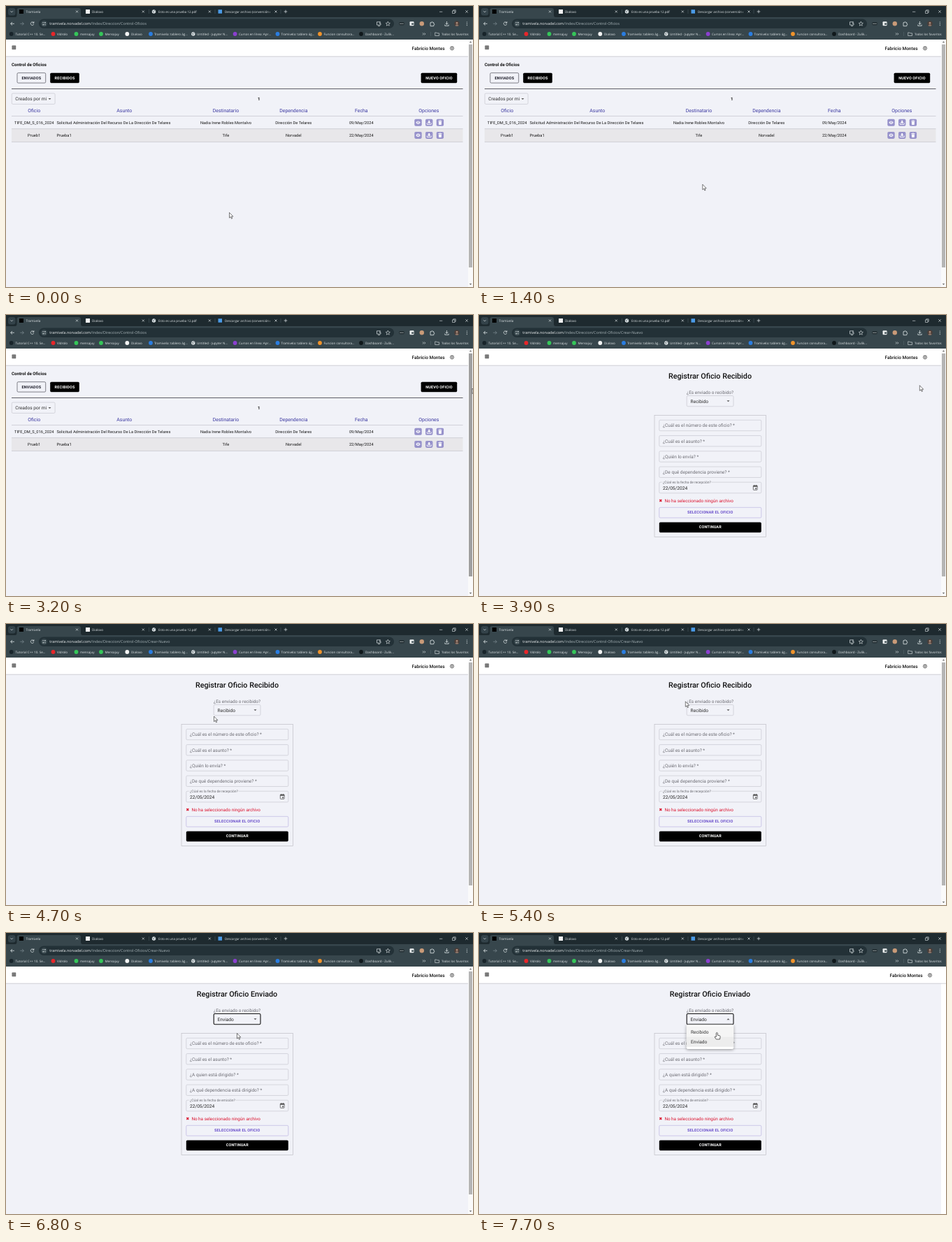
An HTML page that plays this animation: 668x402 px, repeating every 8 s.

```html
<!DOCTYPE html>
<html lang="es">
<head>
<meta charset="utf-8">
<title>Control de Oficios</title>
<style>
  html, body { margin: 0; width: 100%; height: 100%; overflow: hidden; background: #f1f2f8; }
  svg { display: block; width: 668px; height: 402px; text-rendering: geometricPrecision; }
  text { font-family: Roboto, sans-serif; white-space: pre; }
  .ui { font-family: "Open Sans", "Noto Sans", sans-serif; }
  .paper { filter: drop-shadow(0 1.5px 2px rgba(0, 0, 0, .4)); }
</style>
</head>
<body>
<svg id="stage" viewBox="0 0 668 402" xmlns="http://www.w3.org/2000/svg"></svg>
<script>
const LOOP = 8000, STEP = 100;

// --- drawing helpers; y of a text is the middle of its capitals ---
const rect = (x, y, w, h, fill, more = '') =>
  `<rect x="${x}" y="${y}" width="${w}" height="${h}" fill="${fill}" ${more}/>`;
const dot = (x, y, r, fill, more = '') => `<circle cx="${x}" cy="${y}" r="${r}" fill="${fill}" ${more}/>`;
const line = (d, color, w = .7, more = '') => `<path d="${d}" fill="none" stroke="${color}" stroke-width="${w}" ${more}/>`;
const shape = (d, fill, more = '') => `<path d="${d}" fill="${fill}" ${more}/>`;
const text = (s, x, y, size, fill, more = '') =>
  `<text x="${x}" y="${(y + size * .355).toFixed(2)}" font-size="${size}" fill="${fill}" ${more}>${s}</text>`;
const mid = (s, x, y, size, fill, more = '') => text(s, x, y, size, fill, 'text-anchor="middle" ' + more);
const ui = (s, x, y, size = 4.6, fill = '#e3e8ea', more = '') => text(s, x, y, size, fill, 'class="ui" ' + more);
const frame = (x, y, w, h, color = '#c2c2c9', more = '') =>
  rect(x, y, w, h, 'none', `rx="1.6" stroke="${color}" stroke-width=".6" ${more}`);
const group = (id, body, more = '') => `<g id="${id}" ${more}>${body}</g>`;
const caret = (x, y) => shape(`M${x - 2} ${y - 1}h4l-2 2z`, '#555');
const cross = (x, y, r, color, w) =>
  line(`M${x - r} ${y - r}l${2 * r} ${2 * r}m0 ${-2 * r}l${-2 * r} ${2 * r}`, color, w);
const globe = (x, y) => dot(x, y, 2.7, '#dfe5e7') + line(`M${x - 2} ${y - 1}l2 1l-.5 1.6M${x + .5} ${y - 2}l1.2 1.4`, '#4a595f', .8);
const caps = 'font-weight="600" letter-spacing=".14"';

function button(label, x, y, w, h, dark, color = dark ? '#fff' : '#1c1c28', border = '#33333d') {
  const box = dark
    ? rect(x, y, w, h, '#000', 'rx="1.6"') + line(`M${x + 1} ${y + h + .5}h${w - 2}`, '#000', .8, 'opacity=".25"')
    : frame(x, y, w, h, border);
  return box + mid(label, x + w / 2, y + h / 2 - .2, 5.5, color, caps);
}

// --- browser window ---
function browser() {
  const ink = '#dfe6e8';
  let s = rect(0, 0, 668, 48, '#37464c') + rect(0, 0, 668, 16, '#1e2a2f');
  s += rect(3, 3, 10.5, 10.5, '#34434a', 'rx="3"') + line('M6.5 7.3l1.7 1.7l1.7-1.7', ink);
  s += shape('M13 16q2.500 0 2.500-3V6q0-3 3-3H104q3 0 3 3v7q0 3 2.500 3z', '#37464c');
  s += rect(19, 5, 6, 6, '#000') + rect(114, 5, 6, 6, '#f4f4f4') + globe(211.500, 8) + rect(303.500, 5.200, 5.500, 5.500, '#4b9be8');
  s += ui('Tramivela', 28.500, 8) + ui('Dialoxo', 123, 8) + ui('Esto es una prueba 12.pdf', 218, 8, 4.5);
  s += '<clipPath id="tab"><path d="M312 2h66v12h-66z"/></clipPath>' +
    ui('Descargar archivo (conversión de', 313, 8, 4.5, '#e3e8ea', 'clip-path="url(#tab)"');
  for (const x of [101.5, 196.3, 291.3, 386]) s += cross(x, 8, 1.5, ink, .7);
  for (const x of [204.5, 299, 393]) s += line(`M${x} 5v6`, '#52636a', .5);
  s += line('M397.700 8h4.600M400 5.700v4.600', ink);
  s += line('M620 8.300h4.300', ink, .6) + line('M638.500 7h3.500v3.500h-3.500zM639.700 7v-1.200h3.500v3.500h-1.200', ink, .6) + cross(659, 8, 1.8, ink, .6);

  // toolbar
  s += rect(47, 18.5, 508, 13.6, '#233137', 'rx="6.8"');
  s += line('M11.800 25.300H6.700m2.300-2.300l-2.300 2.300l2.300 2.300', ink, .8);
  s += line('M20.300 25.300h5.100m-2.300-2.300l2.300 2.300l-2.300 2.300', '#76868c', .8);
  s += line('M39.600 24a2.300 2.300 0 1 0 .2 1.900M39.900 22.300v2h-2', ink, .8);
  s += dot(54.5, 25.3, 4.6, '#37464c') + line('M52 23.900h2.500M52 26.800h1M55 26.800h2', ink, .7) + dot(56, 23.9, .8, ink) + dot(53.700, 26.8, .8, ink);
  s += ui('tramivela.norvadel.com', 62.3, 25.2, 5.33, '#f1f4f5');
  s += ui('', 121.3, 25.2, 5.33, '#aab6ba', 'id="path"');
  s += line('M535.500 22.800h-5v4.300h5.500v-2M532 28.600h3M535 22.500v2.800m-1.200-1l1.200 1l1.200-1', ink, .7);
  s += line('M546.300 22.200l.9 2.100l2.200.2l-1.700 1.500l.5 2.200l-1.900-1.200l-1.900 1.200l.5-2.200l-1.700-1.500l2.200-.2z', ink, .6);
  s += rect(562.5, 23.3, 7, 4, '#1c272b', 'rx="1"') + line('M563.500 25.300h5', ink, 1, 'stroke-dasharray="1.200 .8"');
  s += rect(577.5, 22.3, 6, 6, '#eef1f1', 'rx="1"') + rect(580, 24.5, 3, 2.4, '#4c5a60');
  s += dot(594.8, 25.3, 3.2, '#c99a78');
  s += line('M607 23.700h1.500a1 1 0 0 1 2 0h1.300v1.600a1 1 0 0 1 0 2v1.400h-4.800z', ink, .8);
  s += line('M630.500 22v4.200m-1.900-1.700l1.900 1.900l1.900-1.900M627.800 26.600v1.700h5.400v-1.700', ink, .8);
  s += dot(645, 25.3, 3.7, '#4a3d38') + dot(645, 24.3, 1.4, '#b08f7e') + shape('M642.400 28q2.600-4 5.200 0q-2.600 2-5.200 0z', '#8c7468');
  for (const y of [23, 25.3, 27.6]) s += dot(659.3, y, .6, ink);

  // bookmarks
  const marks = [
    [7.7, 13.5, '#18242a', 'Tutorial C++ 10. Se...'], [67.5, 73, '#e8262a', 'Vidrolo'],
    [100.5, 106, '#35c659', 'mensajuy'], [136, 141.5, '#35c659', 'Mensajuy'],
    [173.3, 179, '#f2f3f3', 'Dialoxo'], [207, 212, '#2a7de1', 'Tramivela: tablero ág...'],
    [267.8, 273, '', 'Untitled - Jupyter N...'], [327.6, 333, '#8b3fd0', 'Cursos en línea: Apr...'],
    [388.5, 393.5, '#2a7de1', 'Tramivela: tablero ág...'], [449, 454.5, '#f0932b', 'Funcion consultora...'],
    [508, 514, '#10181b', 'Dashboard - Zulik...']
  ];
  for (const [x, tx, color, label] of marks)
    s += (color ? dot(x, 40, 2.9, color) : globe(x, 40)) + ui(label, tx, 40, 4.55);
  s += line('M596 38.500l1.500 1.500l-1.500 1.500M598.300 38.500l1.500 1.500l-1.500 1.500', ink) + line('M607.500 37v6', '#5b6b72', .5);
  s += line('M613.700 38h2l.8.9h3v3.600h-5.800z', ink, .6) + ui('Todos los favoritos', 623, 40, 4.45);
  return s;
}

// --- page parts ---
function header() {
  let gear = dot(0, 0, 2.1, 'none', 'stroke="#555" stroke-width=".8"') + dot(0, 0, .8, '#555');
  for (let i = 0; i < 8; i++) gear += line('M0-2.300v-.9', '#555', 1, `transform="rotate(${i * 45})"`);
  return rect(0, 48, 668, 24, '#fff') + rect(0, 71.8, 668, .7, '#bfbfc6') +
    rect(8.5, 56.6, 5.7, 5.7, '#6c6c6c', 'rx=".6"') + line('M8.500 58.500h5.700M8.500 60.400h5.700M10.400 56.600v5.700M12.300 56.600v5.700', '#a5a5a5', .25) +
    group('user', mid('Fabricio Montes', 604, 60.3, 6.5, '#111', 'font-weight="500"') +
      `<g transform="translate(638 60.4)">${gear}</g>`);
}

function actions(y) {
  let s = '';
  for (const x of [589.5, 605.2, 620.9]) s += rect(x - 5.2, y - 5, 10.4, 10, '#9792cb', 'rx="1.800"');
  s += shape(`M586.300 ${y}q3.200-4.600 6.400 0q-3.200 4.600-6.400 0z`, '#fff') + dot(589.5, y, 1.4, '#9792cb') + dot(589.5, y, .7, '#fff');
  s += shape(`M604.300 ${y - 3}h1.800v2.400h1.500l-2.400 2.200l-2.400-2.200h1.500z`, '#fff') + line(`M602.200 ${y + .6}v2h6v-2`, '#fff', .9);
  return s + shape(`M618.800 ${y - 1.500}h4.200l-.3 4.700h-3.600z`, '#fff') + line(`M618.300 ${y - 2.400}h5.200M620.100 ${y - 3}h1.600`, '#fff', .8);
}

function listPage() {
  let s = text('Control de Oficios', 8, 83.8, 6.2, '#111', 'font-weight="600"');
  s += button('ENVIADOS', 16, 95.7, 40.7, 14.4) + button('RECIBIDOS', 63.2, 95.7, 41.6, 14.4, true) +
    button('NUEVO OFICIO', 593.6, 95.7, 51.6, 14.4, true);
  s += rect(8, 118.2, 645.5, .8, '#3c3c44');
  s += frame(8.3, 125, 61.8, 15.4) + text('Creados por mi', 13.3, 132.8, 6.6, '#333') + caret(62.5, 133);
  s += mid('1', 361.8, 132.8, 6, '#111', 'font-weight="600"');
  const cols = [40.2, 169.3, 314.4, 411.3, 508.3, 604.8];
  ['Oficio', 'Asunto', 'Destinatario', 'Dependencia', 'Fecha', 'Opciones']
    .forEach((h, i) => s += mid(h, cols[i], 149.3, 6.96, '#3a37a0'));
  s += rect(8, 176, 645.5, 18, '#e8e7ea');
  for (const y of [157.3, 175.5, 194]) s += rect(8, y, 645.5, .6, '#bcbcc4');
  const rows = [
    ['TIFE_DM_S_016_2024', 'Solicitud Administración Del Recurso De La Dirección De Telares',
      'Nadia Irene Robles Montalvo', 'Dirección De Telares', '09/May/2024'],
    ['Prueb1', 'Prueba1', 'Tife', 'Norvadel', '22/May/2024']
  ];
  rows.forEach((row, r) => {
    const y = 166.7 + r * 18.2;
    row.forEach((c, i) => s += i === 1 ? text(c, 72.4, y, 5.72, '#1a1a1a') : mid(c, cols[i], y, 5.72, '#1a1a1a'));
    s += actions(y);
  });
  return s;
}

function formPage() {
  const hint = '#6d6d74';
  let s = mid('', 330.5, 87, 10.75, '#111', 'font-weight="500" id="title"');
  s += mid('¿Es enviado o recibido?', 330.6, 110.7, 6.45, hint);
  s += frame(297.2, 115.5, 66.8, 15.3, '#c2c2c9', 'id="select"') + text('', 302.6, 123.3, 6.6, '#2a2a2a', 'id="value"') +
    group('arrow', caret(0, 0));
  s += rect(251, 143.5, 159.5, 174, 'none', 'stroke="#bfbfc6" stroke-width=".7"');
  ['¿Cuál es el número de este oficio? *', '¿Cuál es el asunto? *', '', ''].forEach((label, i) => {
    const y = 150.3 + i * 22.25;
    s += frame(257.8, y, 146, 15.4) + text(label, 263, y + 7.8, 6.52, hint, `id="field${i}"`);
  });
  s += frame(257.8, 239.2, 146, 15.6) + rect(261.5, 238.5, 70, 1.4, '#f1f2f8', 'id="notch"') +
    text('', 263, 239.2, 4.95, hint, 'id="dateLabel"') + text('22/05/2024', 263, 247.3, 6.6, '#222');
  s += rect(392.3, 244, 5.8, 6.3, 'none', 'rx=".6" stroke="#555" stroke-width=".8"') + rect(392.3, 244, 5.8, 1.8, '#555') +
    rect(395.200, 247.4, 1.8, 1.8, '#555') + line('M393.700 243v1M396.700 243v1', '#555', .8);
  s += cross(259.8, 265.5, 1.5, '#d8122c', 1.2) + text('No ha seleccionado ningún archivo', 265.4, 265.3, 6.35, '#dc1530');
  s += button('SELECCIONAR EL OFICIO', 257.8, 275.3, 146, 14.8, false, '#6a4fcb', '#b3a8dc');
  return s + button('CONTINUAR', 257.8, 296.5, 146, 14.4, true);
}

function menu() {
  return rect(296.8, 131, 67.4, 35, '#fff', 'rx="1.800" class="paper"') +
    rect(296.8, 134, 67.4, 14.4, '#fff', 'id="item0"') + rect(296.8, 148.4, 67.4, 14.4, '#fff', 'id="item1"') +
    text('Recibido', 303, 141.2, 6.6, '#333') + text('Enviado', 303, 155.6, 6.6, '#333');
}

const scrollbar = () => rect(661, 48, 7, 354, '#fafafa') + rect(662, 55, 5, 319, '#b5b5b5', 'id="thumb"') +
  shape('M662.800 52.500h3.400l-1.700-2.200zM662.800 397h3.400l-1.700 2.200z', '#777');

const cursor = () =>
  shape('M0 0V7.600L1.800 6L3 8.800L4.200 8.300L3 5.600H5.400Z', '#fff', 'id="pointer" stroke="#222" stroke-width=".6"') +
  shape('M-1 .8Q0-.5 1 .8V4L4 4.700Q5 5 4.800 6.200L4.200 9.800H-1L-3.200 6.600Q-3 5.200-1 6.400Z', '#fff', 'id="hand" stroke="#222" stroke-width=".7"');

const stage = document.getElementById('stage');
stage.innerHTML = rect(0, 48, 668, 354, '#f1f2f8') + rect(661, 72, 7, 330, '#fff') + header() +
  group('list', listPage()) + group('form', formPage()) + group('bar', scrollbar()) +
  group('menu', menu()) + browser() + group('cursor', cursor());
const el = {};
stage.querySelectorAll('[id]').forEach(n => el[n.id] = n);

// --- motion: [time, x, y] of the pointer tip ---
const route = [
  [0, 319.5, 295.5], [100, 319.5, 295.5], [200, 319, 294.8], [300, 319, 294.8], [600, 334.5, 272.3],
  [800, 334.5, 272], [900, 334.5, 265.3], [1000, 334.5, 265], [1400, 319.8, 255.2], [2000, 319.8, 255.2],
  [2700, 400, 96], [2800, 400, 96], [3200, 666.9, 105], [3400, 632.5, 100.5], [3600, 632.5, 100.5],
  [3700, 630.3, 100.7], [4100, 630.3, 100.7], [4700, 297.5, 132], [4800, 297.5, 130], [5200, 373, 122],
  [5400, 295.3, 110.8], [5500, 289, 112], [5800, 345, 123], [6100, 349, 124.4], [6400, 322, 153],
  [6600, 322, 153], [7100, 346, 126], [7300, 346, 126], [7700, 340.3, 142.2], [8000, 340.3, 142.2]
];
function tip(t) {
  const i = Math.max(1, route.findIndex(k => k[0] >= t));
  const [t0, x0, y0] = route[i - 1], [t1, x1, y1] = route[i];
  const p = (t - t0) / (t1 - t0), e = p * p * (3 - 2 * p);
  return [x0 + (x1 - x0) * e, y0 + (y1 - y0) * e];
}

const show = (node, on) => node.setAttribute('display', on ? 'inline' : 'none');
const ramp = (t, start, length) => Math.min(1, Math.max(0, (t - start) / length));

function draw(t) {
  const [x, y] = tip(t);
  const inside = (l, top, r, b) => x >= l && x <= r && y >= top && y <= b;
  const form = t >= 3900, sent = t >= 6500;
  const open = t >= 5900 && t < 6500 || t >= 7300;
  const alpha = t >= 7300 ? ramp(t, 7200, 300) : ramp(t, 5800, 300) * (1 - ramp(t, 6400, 300));

  show(el.list, !form);
  show(el.form, form);
  show(el.bar, !open);
  el.path.textContent = '/Index/Direccion/Control-Oficios' + (form ? '/Crear-Nuevo' : '');
  el.user.setAttribute('transform', `translate(${open ? 7 : 0} 0)`);
  el.thumb.setAttribute('fill', x >= 661 ? '#a0a0a0' : '#b5b5b5');

  const kind = sent ? 'Enviado' : 'Recibido';
  el.title.textContent = 'Registrar Oficio ' + kind;
  el.value.textContent = kind;
  el.field2.textContent = sent ? '¿A quien está dirigido? *' : '¿Quién lo envía? *';
  el.field3.textContent = sent ? '¿A qué dependencia está dirigido? *' : '¿De qué dependencia proviene? *';
  el.dateLabel.textContent = `¿Cúal es la fecha de ${sent ? 'emisión' : 'recepción'}?`;
  el.notch.setAttribute('width', sent ? 67 : 71);

  const onSelect = form && inside(297, 115, 364, 131), focused = t >= 5900;
  el.select.setAttribute('stroke', focused ? '#111' : onSelect ? '#333' : '#c2c2c9');
  el.select.setAttribute('stroke-width', focused ? 1.1 : .6);
  el.arrow.setAttribute('transform', `translate(356.5 123.3) scale(1 ${open ? -1 : 1})`);

  show(el.menu, alpha > 0);
  el.menu.setAttribute('opacity', alpha);
  const grow = open ? .75 + .25 * alpha : 1;
  el.menu.setAttribute('transform', `translate(330.5 131) scale(${grow} ${grow * grow}) translate(-330.5 -131)`);
  [0, 1].forEach(i => {
    const top = 134 + i * 14.4, hover = inside(297, top, 364, top + 14.4);
    el['item' + i].setAttribute('fill', i === +sent ? '#ededed' : hover ? '#f5f5f5' : '#fff');
  });

  const hand = onSelect || open && inside(297, 131, 364, 166) || t < 3700 && inside(593, 95, 645, 110);
  show(el.hand, hand);
  show(el.pointer, !hand);
  el.cursor.setAttribute('transform', `translate(${x.toFixed(2)} ${y.toFixed(2)})`);
}

const begin = performance.now();
function tick() {
  const t = (performance.now() - begin) % LOOP;
  draw(Math.floor(t / STEP) * STEP);
  requestAnimationFrame(tick);
}
tick();
</script>
</body>
</html>
```
